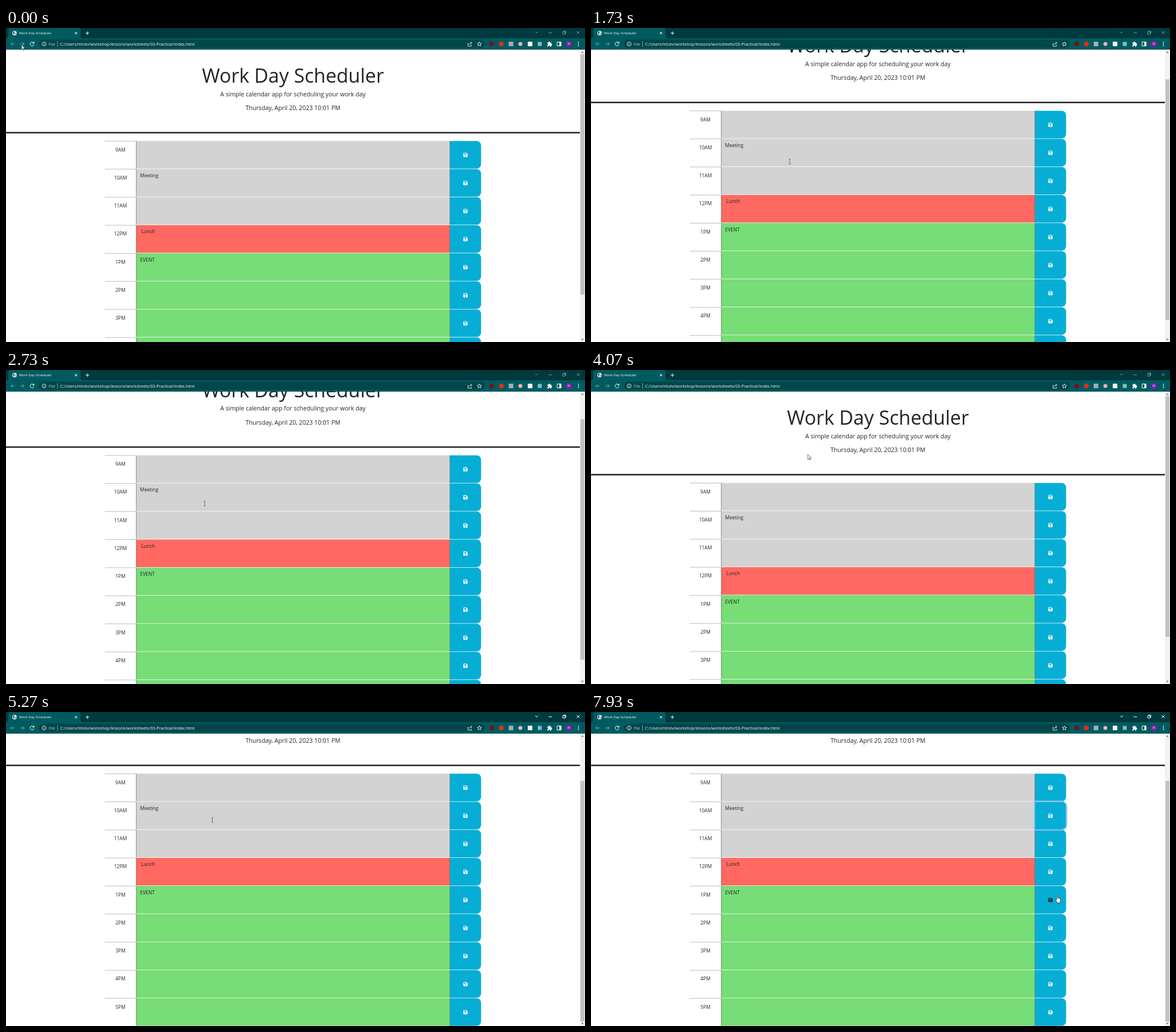
Animation, 1017 px wide and 551 px high, one loop 8 s. Source, as an HTML page:

```html
<!DOCTYPE html>
<html lang="en">
<head>
<meta charset="utf-8">
<title>Work Day Scheduler</title>
<style>
  html, body { margin: 0; width: 100%; height: 100%; overflow: hidden; background: #fff; }
  svg { display: block; font-family: "Open Sans", sans-serif; }
  .line { fill: none; stroke: #fff; stroke-width: 1; }
  .mid { text-anchor: middle; }
</style>
</head>
<body>
<svg id="stage" width="1017" height="551" viewBox="0 0 1017 551">
  <g id="page" fill="#212529">
    <text class="mid" x="504" y="96" font-size="34">Work Day Scheduler</text>
    <g class="mid" font-size="10.6">
      <text x="504" y="119.7">A simple calendar app for scheduling your work day</text>
      <text x="504" y="144">Thursday, April 20, 2023 10:01 PM</text>
    </g>
    <rect y="182.4" width="1008" height="2.6" fill="#28262d"/>
    <g id="rows" font-size="8.47"></g>
    <path id="ring" fill="none" stroke="#8fc3e8" stroke-width="2"/>
  </g>

  <g id="scrollbar">
    <rect x="1008" y="38" width="9" height="513" fill="#f1f1f1"/>
    <rect id="thumb" x="1009" y="46" width="7" height="422" fill="#c1c1c1"/>
    <path d="M1010.5 43.5l2-2.4 2 2.4zM1010.5 545.5l2 2.4 2-2.4z" fill="#606060"/>
  </g>

  <g id="browser">
    <rect width="1017" height="38" fill="#003a3e"/>
    <path d="M0 18q4 0 4-4V4q0-4 4-4h119q4 0 4 4v10q0 4 4 4h882v20H0z" fill="#005b60"/>
    <rect x="58" y="20.5" width="783" height="14.5" rx="7.2" fill="#00464a"/>
    <circle cx="15" cy="9" r="4" fill="#e6eeee"/>
    <path d="M12 7.2l2.6-1.4 1 1.6-1.6 1.4 1 1.6-1 1.6-2-2.4zM16.4 9l2-.6-.6 2.4-1.4.8z" fill="#2d6c70"/>
    <g fill="#fff">
      <text x="23" y="11.3" font-size="6.1">Work Day Scheduler</text>
      <text x="75" y="30.7" font-size="7" fill="#b9cfd0">File</text>
      <text x="95" y="30.7" font-size="7.27">C:/Users/mtolv/workshop/lessons/worksheets/03-Practical/index.html</text>
    </g>
    <path class="line" d="M121 7l4 4m0-4l-4 4M140 9h6m-3-3v6"/>
    <path class="line" stroke-opacity=".45" d="M15.5 28h-7m3-3l-3 3 3 3M25 28h7m-3-3l3 3-3 3"/>
    <path class="line" stroke-width="1.3" d="M48.8 26.2A3.4 3.4 0 1 0 49.2 28.8M49.2 24v2.6h-2.8"/>
    <g class="line" stroke-width=".8" stroke-opacity=".85">
      <circle cx="67" cy="28" r="3.5"/>
      <path d="M67 27.4v2.6m0-4v.8"/>
      <path d="M90.5 23v10" stroke-opacity=".5"/>
      <path d="M813 27h-1.5v5h6v-2.500M814 29.500q.5-3.500 4-3.500m-1.600-1.800l1.900 1.800-1.900 1.800"/>
      <path d="M831.500 24.300l1.100 2.500 2.700.2-2.100 1.800.7 2.700-2.400-1.400-2.400 1.400.7-2.700-2.100-1.800 2.700-.2z"/>
    </g>
    <circle cx="853" cy="28" r="4" fill="#7c0d18"/>
    <circle cx="870" cy="28" r="4.300" fill="#e8281c"/>
    <rect x="883" y="24" width="8" height="8" fill="#a3aeae"/>
    <circle cx="903.500" cy="28" r="3.500" fill="#e9b5b0"/>
    <rect x="916.500" y="24" width="8" height="8" rx="1" fill="#f3f5f5"/>
    <rect x="934" y="24.500" width="7" height="7" fill="#86bcbd"/>
    <path d="M951 25.500h2a1.400 1.400 0 1 1 2.800 0h2v2.200a1.400 1.400 0 1 1 0 2.800v2h-2.400a1.300 1.300 0 1 0-2.400 0h-2v-2.300a1.300 1.300 0 1 0 0-2.600z" fill="#fff"/>
    <path d="M968 24.500h7v7h-7z" class="line"/>
    <path d="M972 24.500h3v7h-3z" fill="#fff"/>
    <circle cx="988.500" cy="28" r="5.600" fill="#7b1fa2"/>
    <text class="mid" x="988.500" y="30.300" font-size="6.300" fill="#fff">H</text>
    <g fill="#fff"><circle cx="1005.500" cy="25" r=".9"/><circle cx="1005.500" cy="28" r=".9"/><circle cx="1005.500" cy="31" r=".9"/></g>
    <path id="controls" class="line" stroke-width=".9" d="M929.500 6.500l2.500 2.500 2.500-2.500M953 8.500h6M978 6.800h4v4h-4zM979.300 6.600v-1.300h4v4h-1.200M1002.500 5.500l5 5m0-5l-5 5"/>
  </g>

  <g id="cursor" stroke-linejoin="round">
    <path id="arrow" d="M0 0v8.500l2-1.900 1.400 3.200 1.400-.6-1.400-3.100h2.700z" fill="#fff" stroke="#333" stroke-width=".7"/>
    <path id="beam" d="M-1.800-4.300h1.300l.5.500.5-.5h1.300M0-3.800v7.600M-1.800 4.300h1.300l.5-.5.5.5h1.300" fill="none" stroke="#444" stroke-width=".7"/>
    <path id="hand" d="M-.9 1q0-1 .9-1t.9 1v3.300q1-.6 1.600.2 1-.5 1.500.4 1.300-.4 1.400.9v3.200q0 1.500-1 2.400v1.400h-4.600v-1.300q-1.700-1.900-2.700-4.300-.2-1.200.8-1.100l1.200 1.200z" fill="#fff" stroke="#222" stroke-width=".7"/>
  </g>
</svg>
<script>
const $ = id => document.getElementById(id);
const LOOP = 8000, FRAME = 1000 / 15;
const TOP = 198.2, PITCH = 49.25, MAX_SCROLL = 90;

const hours = ['9AM', '10AM', '11AM', '12PM', '1PM', '2PM', '3PM', '4PM', '5PM'];
const notes = { 1: [235.6, 'Meeting'], 3: [237.8, 'Lunch'], 4: [235.6, 'EVENT'] };
const disk = 'M-3.7-2.9a.8.8 0 0 1 .8-.8h4.7l1.9 1.9v4.7a.8.8 0 0 1-.8.8h-5.8a.8.8 0 0 1-.8-.8z' +
  'M-2.6-2.6h4.2v2h-4.2zM-1.1 1.6a1.1 1.1 0 1 0 2.2 0a1.1 1.1 0 1 0-2.2 0z';

// Rectangle with rounded right corners
const tab = (x, y, w, h, r) =>
  `M${x} ${y}h${w - r}a${r} ${r} 0 0 1 ${r} ${r}v${h - 2 * r}a${r} ${r} 0 0 1 ${-r} ${r}h${r - w}z`;

const rowColor = i => i < 3 ? '#d3d3d3' : i === 3 ? '#ff6961' : '#77dd77';

$('rows').innerHTML = hours.map((hour, i) => {
  const y = TOP + PITCH * i;
  const [nx, note] = notes[i] || [0, ''];
  return `<path d="M174 ${y + .2}h54.5" stroke="#777" stroke-width=".8" stroke-dasharray="1.6 1"/>
    <text class="mid" x="201" y="${y + 18.3}">${hour}</text>
    <rect x="229" y="${y}" width="550.5" height="48.5" fill="${rowColor(i)}"/>
    <path d="M228.800 ${y}v48.500M779.600 ${y}v48.500" stroke="#000" stroke-opacity=".55" stroke-width=".8"/>
    <text x="${nx}" y="${y + 14.4}">${note}</text>
    <path d="${tab(780, y, 54.5, 48.6, 8)}" fill="#06aed5"/>
    <path class="disk" transform="translate(807 ${y + 24.5})" d="${disk}" fill-rule="evenodd"/>`;
}).join('');
$('ring').setAttribute('d', tab(779, TOP + PITCH - 1, 56.5, 50.6, 9));
const disks = document.querySelectorAll('.disk');

// Start, end, position
const scrolls = [
  [1400, 1730, 53], [2000, 2270, 90], [2610, 2870, 0], [4600, 4900, 53], [4900, 5130, 90]
];
// Start, end, bend x and y, target x and y
const moves = [
  [0, 870, 150, 110, 269, 306],
  [870, 1200, 340, 306, 361, 255],
  [1400, 1730, 355, 244, 349, 234.3],
  [3270, 4070, 521, 189, 380.8, 148.3],
  [4600, 4870, 379, 160, 377.4, 166],
  [4870, 5130, 372, 186, 348.5, 190],
  [5200, 5870, 600, 186, 812.6, 190.3],
  [7270, 7930, 838, 258, 819, 322.3]
];

const ramp = (t, a, b) => Math.min(1, Math.max(0, (t - a) / (b - a)));
const ease = u => u * u * (3 - 2 * u);

function scrollAt(t) {
  return scrolls.reduce((y, [a, b, to]) => y + (to - y) * ease(ramp(t, a, b)), 0);
}

function cursorAt(t) {
  let p = [27.2, 29.5];
  for (const [a, b, cx, cy, x, y] of moves) {
    if (t <= a) break;
    const u = ease(ramp(t, a, b)), v = 1 - u;
    const bend = (from, mid, to) => v * v * from + 2 * u * v * mid + u * u * to;
    p = [bend(p[0], cx, x), bend(p[1], cy, y)];
  }
  return p;
}

function draw(t) {
  const scroll = scrollAt(t), [x, y] = cursorAt(t);
  $('page').setAttribute('transform', `translate(0 ${-scroll})`);
  $('thumb').setAttribute('y', 46 + scroll * 75 / MAX_SCROLL);

  // Hover is only refreshed once the page rests
  const hitY = y + (t < 4900 ? 0 : MAX_SCROLL) - TOP;
  const onButton = hitY > 0 && x >= 780 && x < 834.5;
  const onText = hitY > 0 && x >= 229 && x < 780;
  const row = onButton ? Math.floor(hitY / PITCH) : -1;
  disks.forEach((d, i) => d.setAttribute('fill', i === row ? '#14181c' : '#fff'));

  const kind = onButton ? 'hand' : onText ? 'beam' : 'arrow';
  for (const id of ['arrow', 'beam', 'hand']) $(id).style.display = id === kind ? '' : 'none';
  $('cursor').setAttribute('transform', `translate(${x} ${y})`);

  $('ring').style.opacity = ramp(t, 6133, 6266);
  $('controls').style.opacity = .45 + .55 * ramp(t, 4133, 4266);
}

const start = performance.now();
function tick() {
  const t = (performance.now() - start) % LOOP;
  draw(Math.floor((t + 4) / FRAME) * FRAME % LOOP);
  requestAnimationFrame(tick);
}
tick();
</script>
</body>
</html>
```
